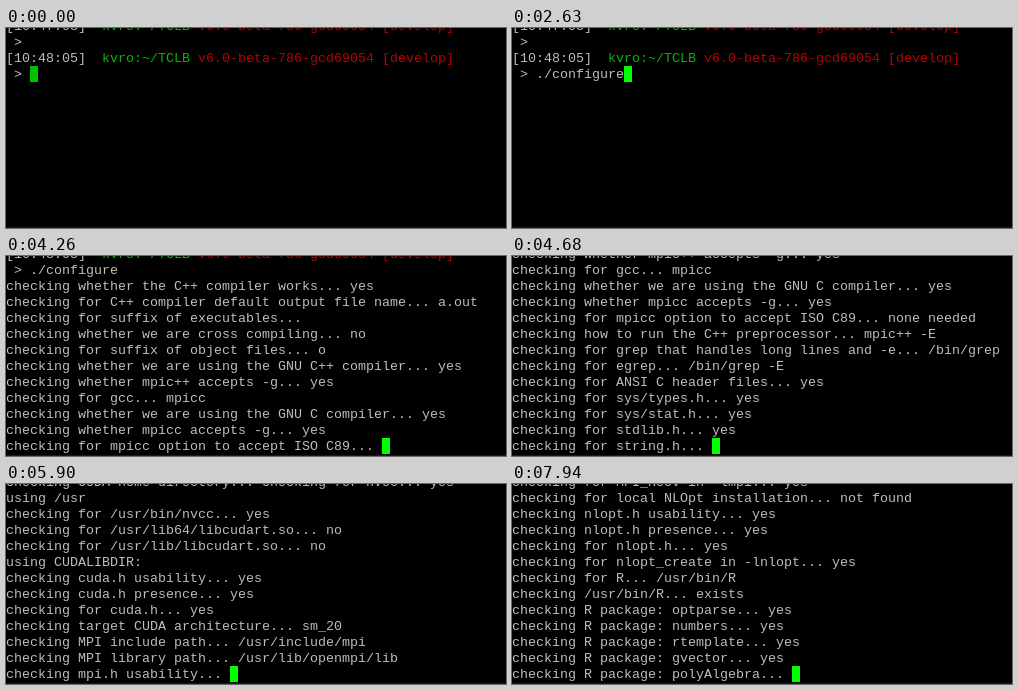
Animation, 500 px wide and 200 px high, one loop 8 s. Source, as an HTML page:

```html
<!DOCTYPE html>
<html lang="en">
<head>
<meta charset="utf-8">
<title>Terminal: configure</title>
<style>
  html, body { margin: 0; width: 100%; height: 100%; overflow: hidden; background: #000; }
  #stage { position: relative; width: 500px; height: 200px; overflow: hidden; background: #000; }
  #screen {
    position: absolute; left: 0; top: -9px; margin: 0; color: #c0bdb6;
    font: 13.3333px/16px "Liberation Mono", "Courier New", monospace;
    font-variant-ligatures: none;
  }
  #screen div { height: 16px; }
  .host { color: #0b0; }
  .branch { color: #b00; }
  .cursor {
    display: inline-block; position: relative; top: -1px; width: 8px; height: 16px;
    vertical-align: top; background: #0f0;
  }
  .idle .cursor { background: #00c000; }
  #edge { position: absolute; left: 0; top: 199px; width: 500px; height: 1px; background: #26141c; }
</style>
</head>
<body>
<div id="stage"><pre id="screen"></pre><div id="edge"></div></div>
<script>
const LOOP = 8000, ROWS = 13;
const COMMAND = "./configure";
const screen = document.getElementById("screen");

const prompt = clock => `[${clock}]  <span class="host">kvro:~/TCLB</span> ` +
  `<span class="branch">v6.0-beta-786-gcd69054 [develop]</span>`;
const header = [prompt("10:47:08"), " &gt;", prompt("10:48:05")];

const output = `checking whether the C++ compiler works... yes
checking for C++ compiler default output file name... a.out
checking for suffix of executables...
checking whether we are cross compiling... no
checking for suffix of object files... o
checking whether we are using the GNU C++ compiler... yes
checking whether mpic++ accepts -g... yes
checking for gcc... mpicc
checking whether we are using the GNU C compiler... yes
checking whether mpicc accepts -g... yes
checking for mpicc option to accept ISO C89... none needed
checking how to run the C++ preprocessor... mpic++ -E
checking for grep that handles long lines and -e... /bin/grep
checking for egrep... /bin/grep -E
checking for ANSI C header files... yes
checking for sys/types.h... yes
checking for sys/stat.h... yes
checking for stdlib.h... yes
checking for string.h... yes
checking for memory.h... yes
checking for strings.h... yes
checking for inttypes.h... yes
checking for stdint.h... yes
checking for unistd.h... yes
checking CUDA home directory... checking for nvcc... yes
using /usr
checking for /usr/bin/nvcc... yes
checking for /usr/lib64/libcudart.so... no
checking for /usr/lib/libcudart.so... no
using CUDALIBDIR:
checking cuda.h usability... yes
checking cuda.h presence... yes
checking for cuda.h... yes
checking target CUDA architecture... sm_20
checking MPI include path... /usr/include/mpi
checking MPI library path... /usr/lib/openmpi/lib
checking mpi.h usability... yes
checking mpi.h presence... yes
checking for mpi.h... yes
checking for MPI_Recv in -lmpi... yes
checking for local NLOpt installation... not found
checking nlopt.h usability... yes
checking nlopt.h presence... yes
checking for nlopt.h... yes
checking for nlopt_create in -lnlopt... yes
checking for R... /usr/bin/R
checking /usr/bin/R... exists
checking R package: optparse... yes
checking R package: numbers... yes
checking R package: rtemplate... yes
checking R package: gvector... yes
checking R package: polyAlgebra... yes`.split("\n");

// [time, characters typed]
const typing = [[0, 0], [1000, 1], [1200, 2], [1410, 3], [1610, 4], [1820, 5], [2030, 6],
  [2230, 7], [2430, 9], [2630, 11]];
// [time, index of the check still running]
const progress = [[0, -1], [3440, 0], [3640, 2], [3840, 4], [4060, 6], [4260, 10], [4460, 14],
  [4680, 18], [4880, 21], [5080, 24], [5290, 27], [5490, 30], [5700, 33], [5900, 36],
  [6700, 39], [6900, 42], [7100, 47], [7320, 48], [7530, 49], [7740, 50], [7940, 51]];

const valueAt = (steps, t) => steps.filter(([start]) => start <= t).pop()[1];
const pending = line => line.replace(/(.*\.\.\.).*/, "$1 ");

let shown = "";
function render(t) {
  const typed = valueAt(typing, t), current = valueAt(progress, t);
  const state = `${typed}/${current}`;
  if (state === shown) return;
  shown = state;

  const lines = [...header, " &gt; " + COMMAND.slice(0, typed)];
  if (current >= 0) lines.push(...output.slice(0, current), pending(output[current]));
  lines[lines.length - 1] += '<span class="cursor"></span>';
  screen.className = typed ? "" : "idle";
  screen.innerHTML = lines.slice(-ROWS).map(line => `<div>${line}</div>`).join("");
}

const start = performance.now();
function tick() {
  render((performance.now() - start) % LOOP);
  requestAnimationFrame(tick);
}
render(0);
requestAnimationFrame(tick);
</script>
</body>
</html>
```
